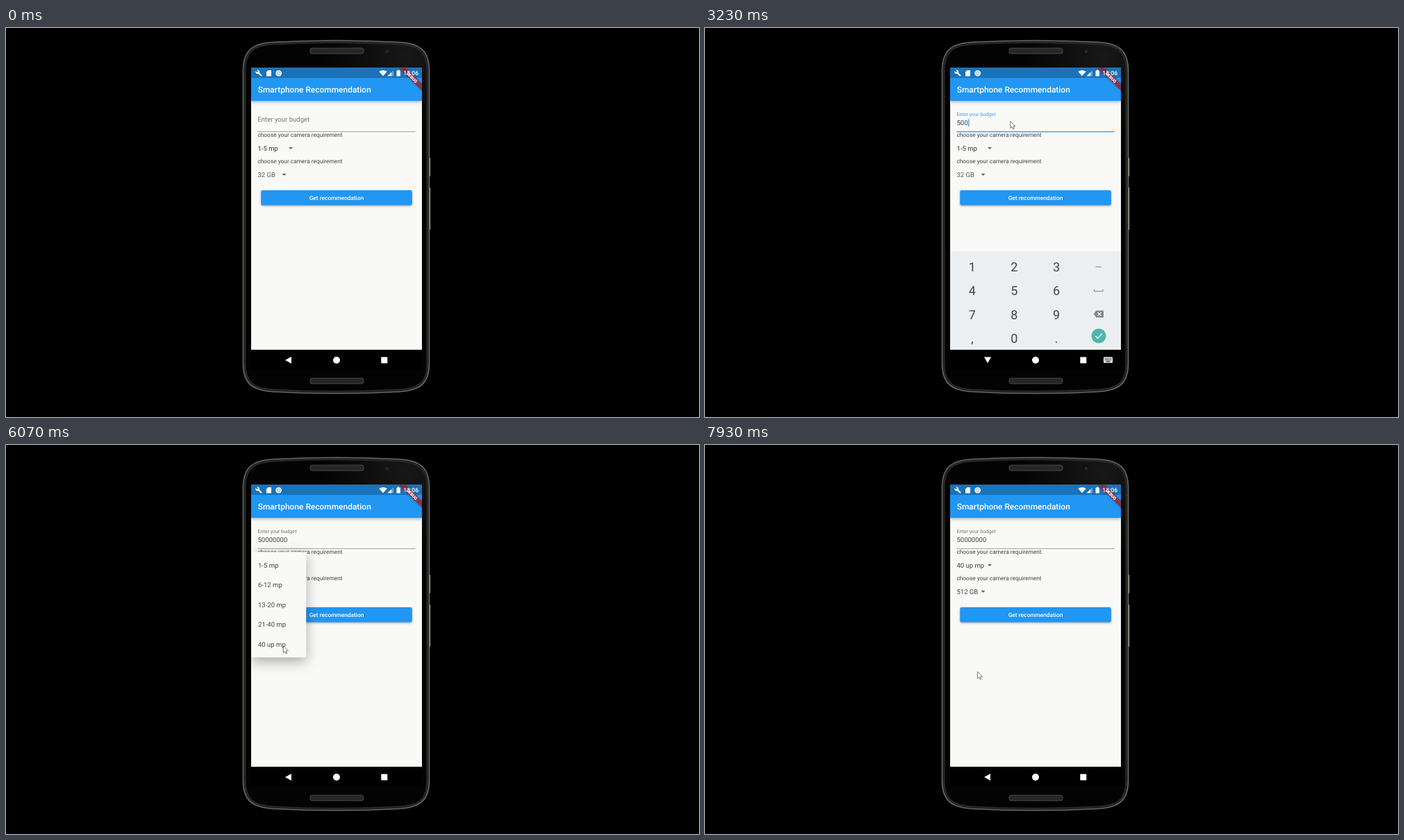
Write an HTML page with a canvas that moves like this. It is 998 px wide and 561 px high and loops after 8000 ms.

```html
<!DOCTYPE html>
<html lang="en">
<head>
<meta charset="utf-8">
<title>Phone form</title>
<style>
html, body { margin: 0; width: 100%; height: 100%; overflow: hidden; background: #000; }
canvas { display: block; width: 998px; height: 561px; }
</style>
</head>
<body>
<canvas id="stage" width="998" height="561"></canvas>
<script>
const ctx = document.getElementById('stage').getContext('2d');
const LOOP = 8000;
const BLUE = '#2196f3';
const PAGE = '#f9f9f8';
const INK = '#424242';
const SCREEN = { x: 353, y: 57.5, w: 246, h: 406.5 };

const clamp = v => Math.max(0, Math.min(1, v));
const lerp = (a, b, p) => a + (b - a) * p;
const span = (t, from, to) => clamp((t - from) / (to - from));
const ease = p => p * p * (3 - 2 * p);

function text(str, x, y, size, color, weight = 400, align = 'left') {
  ctx.font = `${weight} ${size}px Roboto, sans-serif`;
  ctx.textAlign = align;
  ctx.fillStyle = color;
  ctx.fillText(str, x, y);
}

function rect(x, y, w, h, color, r = 0) {
  ctx.fillStyle = color;
  ctx.beginPath();
  ctx.roundRect(x, y, w, h, r);
  ctx.fill();
}

function disc(x, y, r, color) {
  ctx.fillStyle = color;
  ctx.beginPath();
  ctx.arc(x, y, r, 0, 7);
  ctx.fill();
}

function path(points, closed = true) {
  ctx.beginPath();
  points.forEach(([x, y]) => ctx.lineTo(x, y));
  if (closed) ctx.closePath();
}

function poly(points, color) {
  path(points);
  ctx.fillStyle = color;
  ctx.fill();
}

function line(points, color, width) {
  path(points, false);
  ctx.strokeStyle = color;
  ctx.lineWidth = width;
  ctx.stroke();
}

function layer(draw, alpha = 1) {
  ctx.save();
  ctx.globalAlpha *= alpha;
  draw();
  ctx.restore();
}

function shadow(color, blur, dy) {
  ctx.shadowColor = color;
  ctx.shadowBlur = blur;
  ctx.shadowOffsetY = dy;
}

// Phone body
function shell(inset) {
  const l = 341.5 + inset, r = 609.5 - inset, t = 20.5 + inset, b = 524.5 - inset;
  ctx.beginPath();
  ctx.moveTo(l, 62);
  ctx.bezierCurveTo(l, 34, 353 + inset, t + 2, 384, t);
  ctx.quadraticCurveTo(475.5, t - 5, 567, t);
  ctx.bezierCurveTo(598 - inset, t + 2, r, 34, r, 62);
  ctx.lineTo(r, 484);
  ctx.bezierCurveTo(r, 511, 598 - inset, b - 2, 567, b);
  ctx.quadraticCurveTo(475.5, b + 5, 384, b);
  ctx.bezierCurveTo(353 + inset, b - 2, l, 511, l, 484);
  ctx.closePath();
}

function rim(inset, color, width) {
  shell(inset);
  ctx.strokeStyle = color;
  ctx.lineWidth = width;
  ctx.stroke();
}

function speaker(y) {
  rect(437.5, y, 78, 9, '#404040', 4);
  rect(438.7, y + 1.2, 75.6, 6.6, '#262626', 3);
}

function phone() {
  rect(608.5, 187, 2.6, 27, '#b4b4ac', 1);
  rect(608.5, 230, 2.6, 61, '#b4b4ac', 1);
  shell(0);
  const gloss = ctx.createRadialGradient(575, 42, 5, 575, 42, 120);
  gloss.addColorStop(0, '#171717');
  gloss.addColorStop(1, '#030303');
  ctx.fillStyle = gloss;
  ctx.fill();
  rim(2.6, '#262624', 3);
  rim(0, '#6a6a64', 1.6);
  speaker(28.5);
  speaker(504.5);
  disc(549, 34, 3.8, '#15161c');
  disc(549, 34, 1.8, '#292b38');
}

function navBar(t) {
  const open = t >= 2100 && t < 4900;
  rect(353, 464, 246, 29, '#000');
  poly(open ? [[402, 474.5], [412, 474.5], [407, 483.5]]
            : [[402, 479], [411, 474], [411, 484]], '#fff');
  disc(476, 479, 5, '#fff');
  rect(540.3, 474.5, 9, 9, '#fff', 0.8);
  if (!open) return;
  rect(574, 474.5, 13, 8.6, '#eee', 1);
  for (let i = 0; i < 5; i++) {
    rect(575.6 + i * 2.1, 476.2, 1.2, 1.2, '#111');
    rect(575.6 + i * 2.1, 478.3, 1.2, 1.2, '#111');
  }
  rect(577.5, 480.5, 6, 1.2, '#111');
}

// Top bars
function statusBar() {
  line([[362, 63], [368, 69]], '#fff', 2.2);
  disc(362.2, 63.2, 2.8, '#fff');
  poly([[358, 60.5], [360, 59.5], [363, 62.5], [361.5, 64]], '#1a72b9');
  poly([[377.5, 61], [382, 61], [382, 69.5], [375, 69.5], [375, 63.5]], '#fff');
  disc(392.7, 65.2, 4.3, '#fff');
  disc(392.7, 65.2, 2.6, '#7fb3dc');
  disc(392.7, 65.2, 1.6, '#fff');
  ctx.fillStyle = '#fff';
  ctx.beginPath();
  ctx.moveTo(543, 69.3);
  ctx.lineTo(537.3, 62.8);
  ctx.quadraticCurveTo(543, 59.2, 548.7, 62.8);
  ctx.fill();
  poly([[549.5, 69.3], [558, 69.3], [558, 61]], '#6fa7d3');
  poly([[549.5, 69.3], [555, 69.3], [555, 64]], '#fff');
  rect(562.5, 61.5, 5.4, 8, '#fff', 0.6);
  rect(564, 60.6, 2.4, 1.5, '#fff');
  text('13:06', 572.3, 68.3, 8.6, '#fff', 500);
}

function ribbon() {
  layer(() => {
    ctx.translate(599, 57);
    ctx.rotate(Math.PI / 4);
    shadow('rgba(0,0,0,.4)', 3, 0);
    rect(-24, 16.7, 48, 7.2, 'rgba(183,28,28,.66)');
    ctx.shadowColor = 'transparent';
    text('DEBUG', 0, 22.4, 6.1, '#fff', 900, 'center');
  });
}

function topBars() {
  layer(() => {
    shadow('rgba(0,0,0,.28)', 4, 1.6);
    rect(353, 57, 246, 48, BLUE);
  });
  rect(353, 57, 246, 15, '#1a72b9');
  text('Smartphone Recommendation', 362.7, 93.3, 11.94, '#fff', 500);
}

// Form
const BUDGET = '50000000';
const FIRST_KEY = 2900, KEY_GAP = 155;

function budgetField(t) {
  const focused = t >= 2130 && t < 5420;
  const lift = ease(span(t, 2130, 2330));
  const typed = Math.max(0, Math.min(BUDGET.length, Math.floor((t - FIRST_KEY) / KEY_GAP) + 1));
  text('Enter your budget', 362.4, lerp(135.2, 127.4, lift), lerp(9.55, 7.16, lift),
    focused ? '#3d9fee' : '#757575');
  text(BUDGET.slice(0, typed), 362.4, 140.2, 9.55, INK);
  if (focused) rect(362.4, 148.9, 227.2, 1.4, BLUE);
  else rect(362.4, 149, 227.2, 0.8, '#858585');

  const since = typed ? t - FIRST_KEY - (typed - 1) * KEY_GAP : t - 2400;
  if (t >= 2400 && t < 4800 && since % 1000 < 500) {
    rect(363 + typed * 5.365, 131.5, 1.2, 10.5, BLUE);
  }
}

function dropdown(label, y, arrowX, color) {
  text(label, 362.4, y + 3.4, 9.55, color);
  poly([[arrowX - 3, y - 1.3], [arrowX + 3, y - 1.3], [arrowX, y + 1.7]], '#616161');
}

function press(t, from, to, w, x, y) {
  if (t < from || t >= to) return;
  layer(() => {
    ctx.beginPath();
    ctx.rect(362, y - 14, w, 28);
    ctx.clip();
    rect(362, y - 14, w, 28, '#eee');
    disc(x, y - 6, lerp(2, 8, span(t, from, from + 400)), 'rgba(0,0,0,.05)');
  });
}

const CAMERA = {
  open: 5430, close: 6230, y: 173.2, width: 79.3,
  items: ['1-5 mp', '6-12 mp', '13-20 mp', '21-40 mp', '40 up mp']
};
const MEMORY = {
  open: 6900, close: 7840, y: 211.4, width: 69.5,
  items: ['32 GB', '64 GB', '128 GB', '256 GB', '512 GB']
};
const ROW = 28.5, FADE = 85;

function picker(t, m, arrowX, color) {
  const picked = t >= m.close;
  if (t < m.open || picked) dropdown(m.items[picked ? 4 : 0], m.y, arrowX, picked ? INK : color);
}

function menu(t, m) {
  if (t < m.open || t >= m.close + FADE) return;
  const p = span(t, m.open, m.open + 300);
  const grow = span(p, 0.25, 0.5);
  const top = m.y - ROW / 2 - 4.8 * grow;
  const bottom = m.y + ROW / 2 + grow * (ROW * 4 + 4.8);
  layer(() => {
    layer(() => {
      shadow('rgba(0,0,0,.32)', 18, 6);
      rect(353, top, m.width, bottom - top, PAGE, 1.2);
    });
    m.items.forEach((item, i) => {
      const start = 0.5 + (i + 1) * 0.077;
      const alpha = i ? span(p, start, start + 0.115) : 1;
      layer(() => text(item, 363, m.y + i * ROW + 3.4, 9.55, INK), alpha);
    });
  }, span(p, 0, 0.25) * (1 - span(t, m.close, m.close + FADE)));
}

function form(t) {
  const prompt = 'choose your camera requirement';
  budgetField(t);
  press(t, 5100, CAMERA.open, 55, 406, CAMERA.y);
  press(t, 6800, MEMORY.open, 45, 387, MEMORY.y);
  text(prompt, 362.4, 157.4, 8.36, INK);
  picker(t, CAMERA, 410, '#333');
  text(prompt, 362.4, 195.4, 8.36, INK);
  picker(t, MEMORY, 400.5, '#5c5c5c');
  layer(() => {
    shadow('rgba(0,0,0,.35)', 3, 1.3);
    rect(367.3, 234, 217.5, 21.5, BLUE, 2.2);
  });
  text('Get recommendation', 476, 247.8, 8.36, '#fff', 500, 'center');
}

// Number pad
function keyboard(t) {
  const shown = ease(span(t, 2200, 2520)) * (1 - ease(span(t, 4720, 4930)));
  if (!shown) return;
  layer(() => {
    ctx.translate(0, 142 * (1 - shown));
    rect(353, 322, 246, 142, '#eceff1');
    ['123', '456', '789', ',0.'].forEach((row, r) => {
      [...row].forEach((key, c) =>
        text(key, 384.7 + c * 60.7, 350.8 + r * 34.5, 18, '#37474f', 400, 'center'));
    });
    const soft = '#7c888d';
    line([[562.5, 344.5], [571, 344.5]], soft, 1.2);
    line([[560.5, 377], [560.5, 379.7], [573, 379.7], [573, 377]], soft, 1.1);
    poly([[559.7, 412.5], [563.5, 407.5], [574, 407.5], [574, 417.5], [563.5, 417.5]], soft);
    line([[565.5, 410], [570.5, 415]], '#fff', 1.1);
    line([[570.5, 410], [565.5, 415]], '#fff', 1.1);
    disc(567, 444, 10.5, '#4db6ac');
    line([[562.3, 444.2], [565.6, 447.5], [572, 440.8]], '#fff', 1.4);
  });
}

// Pointer stops: time, x, y
const STOPS = [
  [1130, 500, 512], [1500, 476, 300], [1900, 439.8, 134.4],
  [3350, 439.8, 134.4], [3700, 503, 362],
  [4535, 503, 362], [4680, 407, 473],
  [4740, 407, 473], [5020, 406, 166],
  [5130, 406, 166], [5230, 394.5, 358], [5320, 396, 397],
  [5420, 396, 397], [5950, 399.3, 289.6],
  [6250, 399.3, 289.6], [6700, 386.5, 209.8],
  [7070, 386.5, 209.8], [7600, 392.4, 326.8], [8000, 392.4, 326.8]
];

function pointer(t) {
  if (t < STOPS[0][0]) return;
  const i = STOPS.findIndex(s => s[0] > t);
  const [t0, x0, y0] = STOPS[i - 1], [t1, x1, y1] = STOPS[i];
  const p = span(t, t0, t1);
  layer(() => {
    ctx.translate(lerp(x0, x1, p), lerp(y0, y1, p));
    path([[0, 0], [0, 10], [2.3, 8], [3.8, 11.4], [5.4, 10.7], [4, 7.4], [7, 7.2]]);
    ctx.fillStyle = '#fff';
    ctx.fill();
    ctx.strokeStyle = '#666';
    ctx.lineWidth = 0.9;
    ctx.stroke();
  });
}

function draw(t) {
  rect(0, 0, 998, 561, '#000');
  phone();
  layer(() => {
    ctx.beginPath();
    ctx.rect(SCREEN.x, SCREEN.y, SCREEN.w, SCREEN.h);
    ctx.clip();
    rect(SCREEN.x, SCREEN.y, SCREEN.w, SCREEN.h, PAGE);
    form(t);
    topBars();
    menu(t, CAMERA);
    menu(t, MEMORY);
    ribbon();
    statusBar();
    keyboard(t);
  });
  navBar(t);
  pointer(t);
}

ctx.textRendering = 'geometricPrecision';
const began = performance.now();
function tick() {
  draw((performance.now() - began) % LOOP);
  requestAnimationFrame(tick);
}
tick();
</script>
</body>
</html>
```
